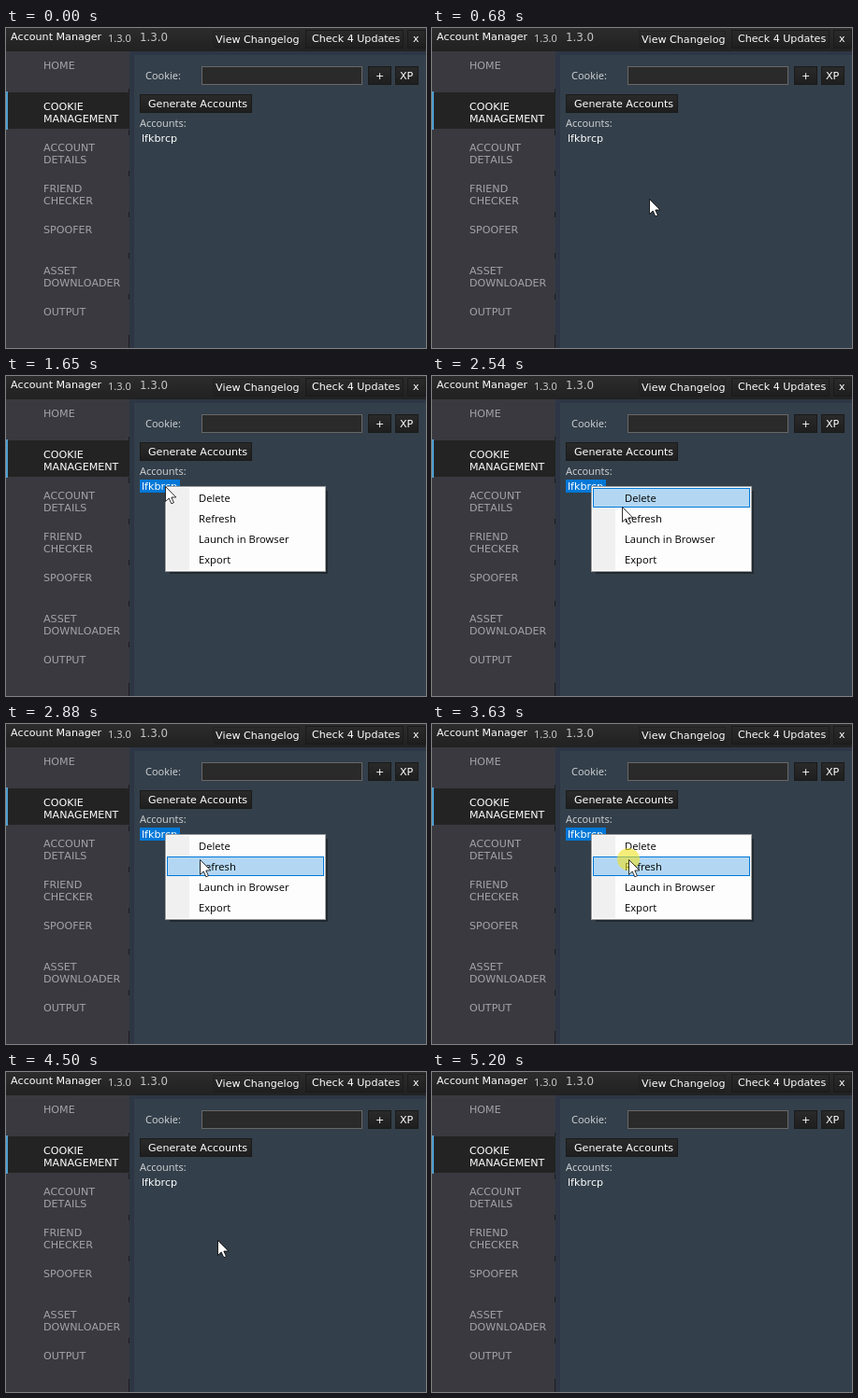
Animation of 449x343 px, one loop 6210 ms. Source, as an HTML page:

```html
<!DOCTYPE html>
<html lang="en">
<head>
<meta charset="utf-8">
<title>Account Manager</title>
<style>
  html, body { margin: 0; width: 100%; height: 100%; overflow: hidden; background: #333f4a; }
  svg { display: block; }
  text { font: 11.1px "DejaVu Sans", sans-serif; font-kerning: none; fill: #fff; white-space: pre; }
  .nav text { fill: #a3a3a8; }
  .nav .on { fill: #fff; }
  .ui { font: 11px "Open Sans", sans-serif; fill: #d4d6d8; }
  #menu text { font: 11.2px "Open Sans", sans-serif; fill: #000; }
  rect { shape-rendering: crispEdges; }
  .btn rect { fill: url(#face); stroke: #1a1a1a; }
</style>
</head>
<body>
<svg width="449" height="343" viewBox="0 0 449 343">
  <defs>
    <linearGradient id="bar" x2="0" y2="1">
      <stop stop-color="#2c2c2c"/><stop offset="1" stop-color="#212121"/>
    </linearGradient>
    <linearGradient id="face" x2="0" y2="1">
      <stop stop-color="#2a2a2a"/><stop offset="1" stop-color="#1e1e1e"/>
    </linearGradient>
  </defs>

  <rect width="449" height="343" fill="#333f4a"/>
  <rect y="25" width="132" height="318" fill="#3a3940"/>
  <rect x="132" y="25" width="5" height="318" fill="#2d3644"/>
  <rect x="137" y="25" width="312" height="4" fill="#2d3644"/>
  <path d="M131.5 65v5m0 39v6m0 38v6m0 38v6m0 38v6m0 38v6m0 38v14" stroke="#1c1c20"/>
  <rect width="449" height="25" fill="url(#bar)"/>

  <text x="5" y="13">Account Manager</text>
  <text x="109" y="15" class="ui">1.3.0</text>
  <text x="143" y="14" style="font-size:11.8px;fill:#c4c4c4">1.3.0</text>

  <g class="btn">
    <rect x="221.5" y="3.5" width="92" height="19" style="stroke:#222"/><text x="224" y="16">View Changelog</text>
    <rect x="320.5" y="2.5" width="104" height="19"/><text x="327" y="15">Check 4 Updates</text>
    <rect x="429.5" y="2.5" width="19" height="19"/><text x="435" y="15">x</text>
    <rect x="387.5" y="41.5" width="24" height="19"/><text x="395" y="55">+</text>
    <rect x="416.5" y="41.5" width="24" height="19"/><text x="421" y="55">XP</text>
    <rect x="143.5" y="71.5" width="119" height="19"/><text x="152" y="85">Generate Accounts</text>
  </g>

  <rect y="69" width="132" height="39" fill="#232323"/>
  <rect y="68" width="2" height="41" fill="#4f9fd0"/>
  <g class="nav" transform="translate(40)">
    <text y="44">HOME</text>
    <text y="88" class="on">COOKIE</text>
    <text y="101" class="on">MANAGEMENT</text>
    <text y="132">ACCOUNT</text>
    <text y="145">DETAILS</text>
    <text y="176">FRIEND</text>
    <text y="189">CHECKER</text>
    <text y="220">SPOOFER</text>
    <text y="264">ASSET</text>
    <text y="277">DOWNLOADER</text>
    <text y="308">OUTPUT</text>
  </g>

  <text x="149" y="55" class="ui">Cookie:</text>
  <rect x="209.5" y="41.5" width="171" height="19" fill="#2a2a2a" stroke="#686868"/>
  <text x="143" y="106" class="ui">Accounts:</text>
  <rect id="pick" x="143" y="111" width="43" height="14" fill="#0078d7"/>
  <text x="145" y="122">lfkbrcp</text>

  <g id="menu">
    <rect x="175" y="123" width="169" height="89" fill="#000" opacity=".35"/>
    <rect x="170.5" y="118.5" width="171" height="91" fill="#fdfdfd" stroke="#a0a0a0"/>
    <rect x="172" y="120" width="24" height="88" fill="#f0f0f0"/>
    <rect id="hover" x="172.5" width="167" height="20" fill="#b3d7f3" stroke="#0078d7"/>
    <text x="206" y="135">Delete</text>
    <text x="206" y="157">Refresh</text>
    <text x="206" y="179">Launch in Browser</text>
    <text x="206" y="201">Export</text>
  </g>

  <g id="cursor">
    <circle id="click" r="12" fill="#f0e322" opacity=".6"/>
    <path d="M.5 .5V16.5L4.2 13L6.8 18.8L9.4 17.7L6.8 12H11.8Z" fill="#fff" stroke="#000" stroke-width=".8"/>
  </g>
</svg>
<script>
const LOOP = 6210, STEP = 70;

// Each run: start time, then [step, x, y] keys for the pointer tip
const runs = [
  [260, [0, 391, 336], [4, 265, 214], [8, 199, 152], [10, 182, 132], [13, 170, 118]],
  [1980, [-1, 170, 118], [1, 175, 121], [6, 199, 137], [8, 203, 140], [9, 204, 142], [11, 206, 144], [13, 207, 145]],
  [3080, [-1, 207, 145], [2, 210, 145]],
  [4290, [-1, 210, 145], [1, 215, 157], [3, 226, 180], [8, 287, 278], [12, 346, 341], [13, 361, 360]]
];

const el = id => document.getElementById(id);
const show = (id, on) => el(id).style.display = on ? "" : "none";
const within = (t, from, to) => t >= from && t < to;

function tipAt(t) {
  const run = runs.filter(r => t >= r[0]).pop();
  if (!run) return null;
  const [start, ...keys] = run;
  const step = Math.floor((t - start) / STEP);
  const i = keys.findIndex(k => k[0] >= step);
  if (i < 0) return keys[keys.length - 1].slice(1);
  if (i === 0) return keys[0].slice(1);
  const a = keys[i - 1], b = keys[i], f = (step - a[0]) / (b[0] - a[0]);
  return [1, 2].map(n => Math.round(a[n] + (b[n] - a[n]) * f));
}

function draw() {
  const t = performance.now() % LOOP;
  const tip = t < 5200 ? tipAt(t) : null;
  show("cursor", tip);
  show("pick", within(t, 1310, 3760));
  show("menu", within(t, 1650, 3760));
  show("click", within(t, 1240, 1380) || within(t, 1580, 1650) || within(t, 3630, 3760));
  if (tip) {
    const [x, y] = tip;
    el("cursor").setAttribute("transform", `translate(${x} ${y})`);
    show("hover", y >= 120);
    el("hover").setAttribute("y", y < 142 ? 120.5 : 142.5);
  }
  requestAnimationFrame(draw);
}
draw();
</script>
</body>
</html>
```
